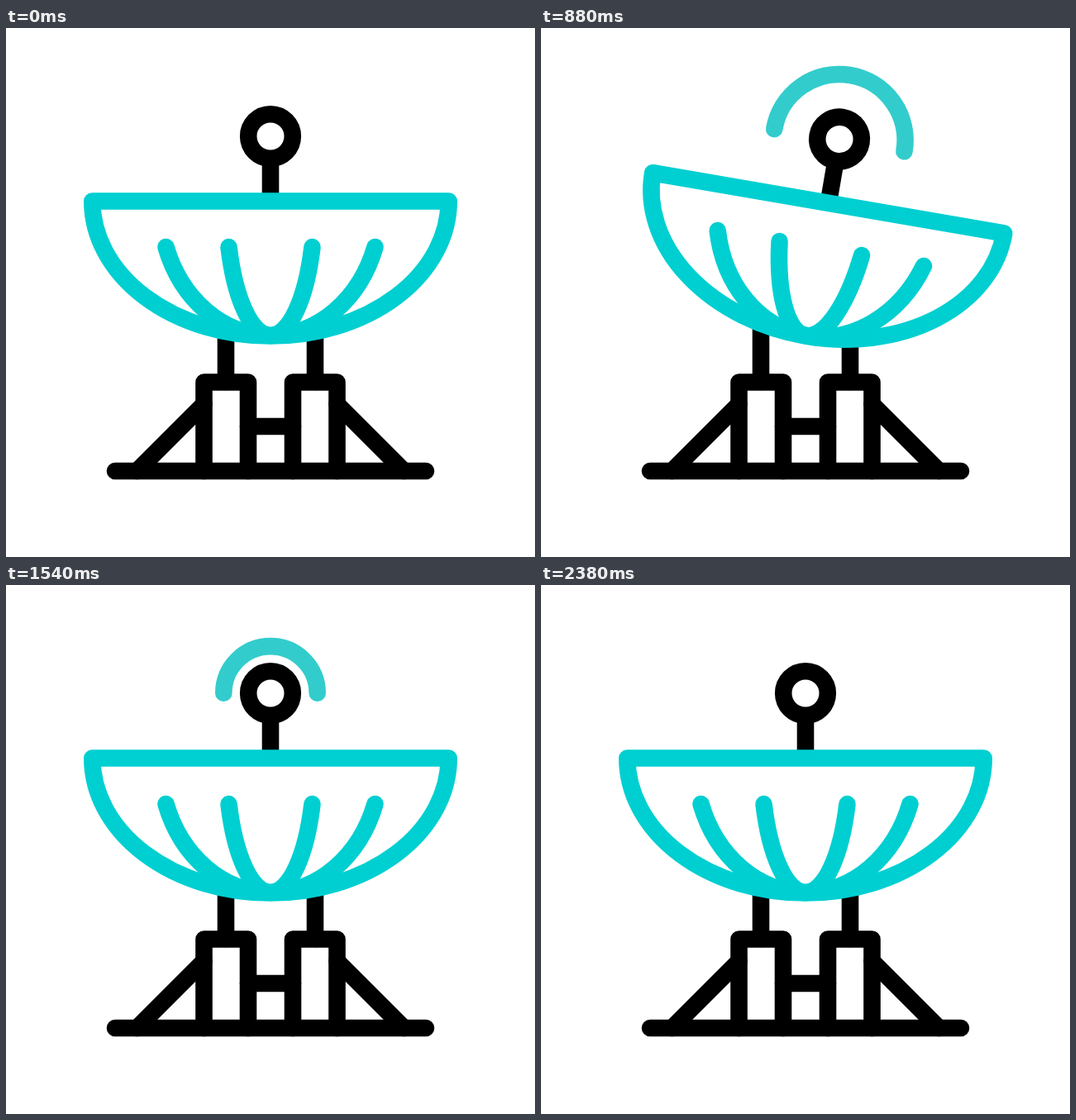
Animation of 640x640 px, one loop 2400 ms. Source, as an HTML page with a canvas:

```html
<!DOCTYPE html>
<html lang="en">
<head>
<meta charset="utf-8">
<title>Satellite dish</title>
<style>
  html, body { margin: 0; width: 100%; height: 100%; overflow: hidden; background: #fff; }
  canvas { display: block; width: 100vw; height: 100vh; }
</style>
</head>
<body>
<canvas id="stage" width="640" height="640"></canvas>
<script>
const ctx = document.getElementById('stage').getContext('2d');
const LOOP = 2400;
const BLACK = '#000', CYAN = '#00cfd1', WAVE = '#33cccc', WHITE = '#fff';
const LINE = 20.6;
const PIVOT = { x: 320, y: 373 };
const BALL = { x: 320, y: 131 };

// Swing of the dish: [time in ms, angle in degrees]
const SWING = [[0, 0], [612, 24], [1242, -19.5], [1840, 19.5], [2380, 0], [2400, 0]];

const WAVE_STARTS = [438, 820, 1226];
const WAVE_LIFE = 675, FADE_START = 463, WAVE_SPEED = 0.18;

// Symmetric cubic bezier (0.6, 0, 0.4, 1), solved by bisection
function ease(x) {
  let lo = 0, hi = 1;
  for (let i = 0; i < 24; i++) {
    const s = (lo + hi) / 2;
    if (1.8 * s - 2.4 * s * s + 1.6 * s ** 3 < x) lo = s; else hi = s;
  }
  return lo * lo * (3 - 2 * lo);
}

function swingAngle(t) {
  const i = SWING.findIndex(key => t < key[0]);
  const [t0, a0] = SWING[i - 1], [t1, a1] = SWING[i];
  return (a0 + (a1 - a0) * ease((t - t0) / (t1 - t0))) * Math.PI / 180;
}

function stroke(color, d, fill) {
  const path = new Path2D(d);
  if (fill) {
    ctx.fillStyle = fill;
    ctx.fill(path);
  }
  ctx.strokeStyle = color;
  ctx.stroke(path);
}

function drawStand() {
  stroke(BLACK, 'M266 428V310M374 428V310');
  stroke(BLACK, 'M239.5 536V428.5H293V536M347 536V428.5H400.5V536');
  stroke(BLACK, 'M293 482H347M132 536H508');
  stroke(BLACK, 'M239.5 455L158.5 536M400.5 455L481.5 536');
}

function drawWave(age) {
  if (age <= 0 || age >= WAVE_LIFE) return;
  const r = age * WAVE_SPEED;
  const fade = Math.max(0, (age - FADE_START) / (WAVE_LIFE - FADE_START));
  ctx.globalAlpha = 1 - fade * fade;
  ctx.strokeStyle = WAVE;
  ctx.beginPath();
  ctx.arc(BALL.x, BALL.y - 3.7 + 0.062 * r, r, Math.PI, 2 * Math.PI);
  ctx.stroke();
  ctx.globalAlpha = 1;
}

function drawReceiver() {
  stroke(BLACK, 'M320 160V208');
  ctx.beginPath();
  ctx.arc(BALL.x, BALL.y, 26.8, 0, 2 * Math.PI);
  ctx.fillStyle = WHITE;
  ctx.fill();
  ctx.stroke();
}

function drawBowl() {
  stroke(CYAN, 'M104.3 209.5H535.7A215.7 163 0 0 1 104.3 209.5Z', WHITE);
  stroke(CYAN, 'M193.5 265C212 328 262 372 320 372C378 372 428 328 446.5 265');
  stroke(CYAN, 'M269.5 265C277 328 297 372 320 372C343 372 363 328 370.5 265');
}

function draw(t) {
  ctx.fillStyle = WHITE;
  ctx.fillRect(0, 0, 640, 640);
  ctx.lineWidth = LINE;
  ctx.lineCap = ctx.lineJoin = 'round';
  drawStand();
  ctx.save();
  ctx.translate(PIVOT.x, PIVOT.y);
  ctx.rotate(swingAngle(t));
  ctx.translate(-PIVOT.x, -PIVOT.y);
  WAVE_STARTS.forEach(start => drawWave(t - start));
  drawReceiver();
  drawBowl();
  ctx.restore();
}

const begin = performance.now();
function tick() {
  draw((performance.now() - begin) % LOOP);
  requestAnimationFrame(tick);
}
tick();
</script>
</body>
</html>
```
